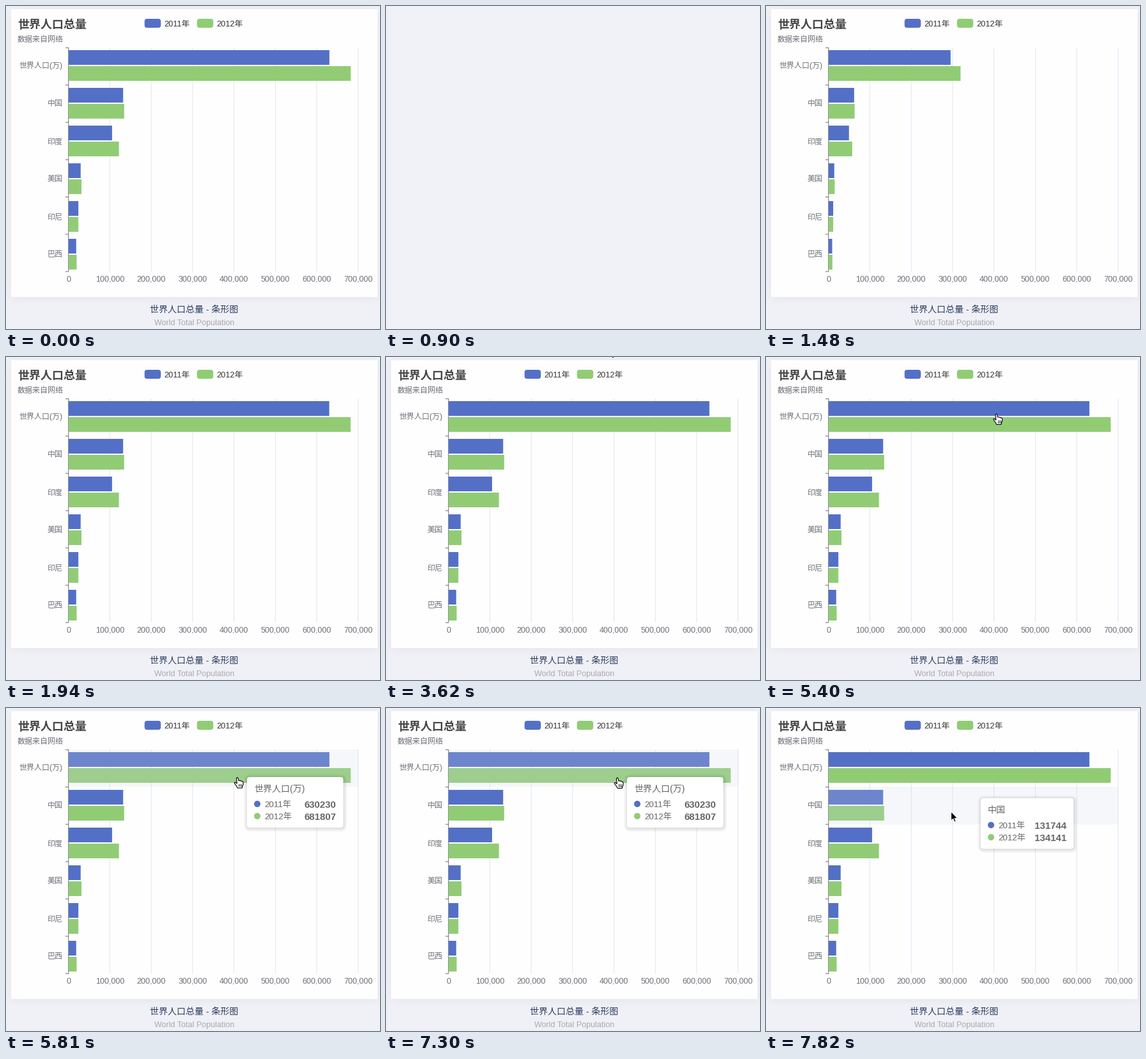
Write a matplotlib script that moves like this. It is 585 by 505 pixels and loops after 8000 ms.

```python
import numpy as np
import matplotlib.pyplot as plt
from matplotlib.animation import FuncAnimation
from matplotlib.patches import Circle, FancyBboxPatch, Polygon, Rectangle
from matplotlib.transforms import Affine2D

W, H, DPI = 585, 505, 64
STEP, LOOP = 20, 8000
PX = 72 / DPI
FONTS = ["Liberation Sans", "Noto Sans CJK JP"]
BLUE, GREEN, GREY = "#5470c6", "#91cc75", "#6e7079"
BACKDROP = np.array([241, 242, 248]) / 255

LEFT, TOP, BOTTOM = 98, 65, 415
BAND = (BOTTOM - TOP) / 6
SCALE = 453 / 700000
NAMES = ["世界人口(万)", "中国", "印度", "美国", "印尼", "巴西"]
Y2011 = [630230, 131744, 104970, 29034, 23489, 18203]
Y2012 = [681807, 134141, 121594, 31000, 23438, 19325]

RELOAD, GROW, GROW_TIME = 900, 991, 1000
FIRST_TIP, TIP_GONE, SECOND_TIP, LEAVE = 4090, 4320, 5460, 7300

# Pointer hot spot: time, x, y
PATH = np.array([
    (3600, 349, -40), (3620, 349, -14), (3850, 354, 24), (4090, 359, 66),
    (4140, 359.5, 73), (4320, 360, 78), (4560, 360, 78), (4800, 360, 86),
    (5380, 360, 86), (5400, 360.5, 89), (5810, 362, 109), (7300, 362, 109),
    (7820, 289.5, 162), (8000, 289.5, 162),
])

fig = plt.figure(figsize=(W / DPI, H / DPI), dpi=DPI, facecolor=BACKDROP)
ax = fig.add_axes([0, 0, 1, 1])


def clamp(v):
    return min(max(v, 0.0), 1.0)


def cubic_in_out(p):
    p = clamp(p)
    return 4 * p ** 3 if p < 0.5 else 1 - (2 - 2 * p) ** 3 / 2


def ease_out(p, power=5):
    return 1 - (1 - clamp(p)) ** power


def label(x, cy, text, size, color, ha="left", weight="normal", **kw):
    return ax.text(x, cy + 0.37 * size, text, fontsize=size * PX, color=color,
                   ha=ha, va="baseline", fontfamily=FONTS, fontweight=weight, **kw)


def line(xs, ys, color):
    ax.plot(xs, ys, color=color, lw=PX, zorder=1, snap=False, solid_capstyle="butt")


def rounded(x, y, w, h, r, color, **kw):
    return ax.add_patch(FancyBboxPatch(
        (x, y), w, h, boxstyle=f"round,pad=0,rounding_size={r}",
        facecolor=color, edgecolor="none", **kw))


def card_picture():
    def span(v, lo, hi, soft):
        return (np.tanh((v - lo) / soft) - np.tanh((v - hi) / soft)) / 2

    x, y = np.arange(W) + 0.5, np.arange(H) + 0.5
    shade = 0.055 * np.outer(span(y, 7, 457, 9), span(x, 8, 581, 9))
    picture = BACKDROP * (1 - shade[..., None])
    picture[5:455, 8:581] = 254 / 255
    return picture


def draw_chart():
    ax.imshow(card_picture(), extent=(0, W, H, 0), interpolation="nearest", zorder=0)
    label(18, 28.5, "世界人口总量", 18, "#464646", weight="bold")
    label(18, 52, "数据来自网络", 12, GREY)
    for x, color, year in ((216.7, BLUE, "2011年"), (298.7, GREEN, "2012年")):
        rounded(x, 20, 25.5, 14, 4, color)
        label(x + 30.8, 27, year, 12.8, "#333333")
    for k in range(8):
        x = LEFT + k * 100000 * SCALE
        if k:
            line([x - 0.25] * 2, [TOP, BOTTOM], "#e0e6f1")
        label(x, 426, f"{k * 100000:,}", 12.5, GREY, "center")
    for i, name in enumerate(NAMES):
        label(89, 93 + 59 * i, name, 12, GREY, "right")
    line([LEFT - 0.25] * 2, [TOP, BOTTOM], GREY)
    for k in range(7):
        line([93, LEFT], [TOP + k * BAND + 0.25] * 2, GREY)
    label(294.5, 473, "世界人口总量 - 条形图", 14, "#2c3e60", "center")
    # The last caption loses its descenders at the edge of its box.
    caption = label(294.5, 494, "World Total Population", 12.5, "#a9a9ae", "center")
    caption.set_clip_path(Rectangle((0, 0), W, 499, transform=ax.transData))


class Tooltip:
    def __init__(self):
        self.shift = Affine2D()
        self.h = 79
        place = dict(transform=self.shift + ax.transData, zorder=6)
        self.shadows = [rounded(0, 0, 1, 1, 4 + g, "black", **place) for g in range(1, 7)]
        self.box = rounded(0, 0, 1, self.h, 4, "white", **place)
        self.title = label(11, 18, "", 14, "#666666", **place)
        self.values, self.parts = [], [self.box, self.title]
        for y, color, year in ((42, BLUE, "2011年"), (61, GREEN, "2012年")):
            dot = ax.add_patch(Circle((16, y), 5, facecolor=color, edgecolor="none", **place))
            year_text = label(27, y, year, 13.3, "#666666", **place)
            value = label(0, y, "", 15, "#666666", "right", "bold", **place)
            self.values.append(value)
            self.parts += [dot, year_text, value]

    def show(self, x, y, row, alpha):
        w = 145 if row else 150.5
        self.shift.clear().translate(x, y)
        self.box.set_width(w)
        for g, patch in enumerate(self.shadows, 1):
            patch.set_bounds(1 - g, 1.5 - g, w + 2 * g - 1, self.h + 2 * g - 1)
            patch.set_alpha(0.018 * alpha)
        self.title.set_text(NAMES[row])
        for text, data in zip(self.values, (Y2011, Y2012)):
            text.set_text(str(data[row]))
            text.set_x(w - 11)
        for part in self.parts:
            part.set_alpha(alpha)

    def set_visible(self, on):
        for part in self.parts + self.shadows:
            part.set_visible(on)


class Pointer:
    ARROW = [(0, 0), (0, 14), (3.2, 11.2), (5.4, 16.3), (7.6, 15.3), (5.5, 10.4), (9.9, 10.2)]
    HAND = [(-1.6, 1.2), (-0.3, 0), (1, 1), (1.8, 5), (3, 4.6), (4.2, 5.4),
            (5.6, 5.2), (6.6, 6.2), (8.2, 6.3), (9.2, 8), (9, 11.5), (7.6, 14.4),
            (7.5, 16.5), (0, 16.5), (-1, 14), (-4, 10), (-4.8, 8.2), (-3.4, 7.4),
            (-0.7, 9.6)]

    def __init__(self):
        self.shift = Affine2D()
        place = dict(transform=self.shift + ax.transData, zorder=9)
        self.arrow = ax.add_patch(Polygon(self.ARROW, facecolor="black",
                                          edgecolor="white", lw=PX, **place))
        self.hand = [ax.add_patch(Polygon(self.HAND, facecolor="white",
                                          edgecolor="black", lw=1.1 * PX, **place))]
        for x in (2, 4.2, 6.3):
            self.hand += ax.plot([x, x], [10, 13.5], color="black", lw=0.8 * PX, **place)

    def move(self, x, y):
        on_item = 69 <= y <= 118 or 20 <= y <= 34
        self.shift.clear().translate(x, y)
        self.arrow.set_visible(not on_item)
        for part in self.hand:
            part.set_visible(on_item)


def make_bars():
    bars = []
    for i, pair in enumerate(zip(Y2011, Y2012)):
        for k, (value, color) in enumerate(zip(pair, (BLUE, GREEN))):
            bar = Rectangle((LEFT, 69 + 59 * i + 25 * k), 0, 23, snap=False,
                            facecolor=color, edgecolor="none", zorder=2)
            bars.append((ax.add_patch(bar), value * SCALE))
    return bars


def tooltip_state(t, row):
    """Position, row and opacity of the tooltip, or None while hidden."""
    if FIRST_TIP <= t < TIP_GONE:
        q = ease_out((t - FIRST_TIP) / 400)
        return 8 + 369 * q, 5 + 69 * q, row, ease_out((t - FIRST_TIP) / 200)
    if t >= SECOND_TIP:
        q = ease_out((t - SECOND_TIP) / 400)
        u = clamp((t - LEAVE - 60) / 460)
        return 377 - 41 * u, 74 + 34 * q + 33 * u, row, ease_out((t - SECOND_TIP) / 200)
    return None


def update(frame):
    t = frame * STEP
    ax.set_visible(not RELOAD <= t < GROW)
    grown = 1 if t < RELOAD else cubic_in_out((t - GROW) / GROW_TIME)
    for bar, width in bars:
        bar.set_width(width * grown)

    x, y = (np.interp(t, PATH[:, 0], PATH[:, k]) for k in (1, 2))
    pointer.move(x, y)

    row = int(y > TOP + BAND)
    state = tooltip_state(t, row)
    tooltip.set_visible(state is not None)
    band.set_visible(state is not None)
    if state:
        tooltip.show(*state)
        band.set_y(TOP + row * BAND)
    return []


draw_chart()
bars = make_bars()
band = ax.add_patch(Rectangle((LEFT, TOP), 453, BAND, facecolor="#d2dbee",
                              edgecolor="none", alpha=0.2, zorder=4))
tooltip = Tooltip()
pointer = Pointer()
ax.set_aspect("auto")
ax.set_xlim(0, W)
ax.set_ylim(H, 0)
ax.axis("off")

anim = FuncAnimation(fig, update, frames=LOOP // STEP, interval=STEP,
                     init_func=lambda: update(0), repeat=True, repeat_delay=0)
plt.show()
```
